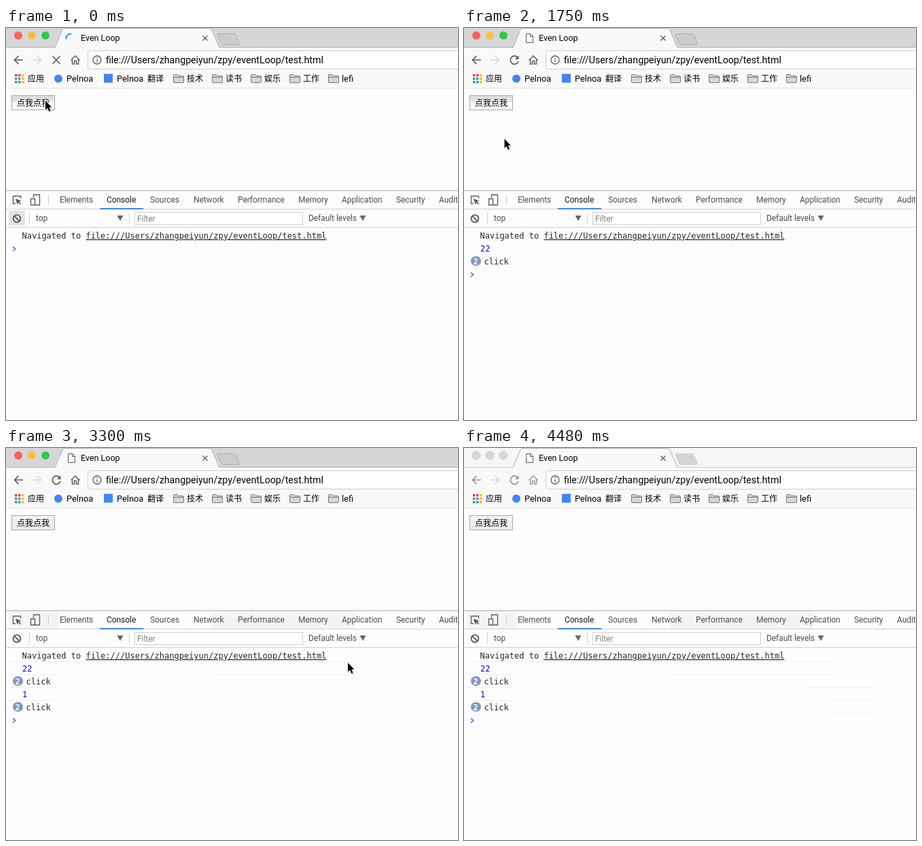
Animation of 665x577 px, one loop 4580 ms. Source, as an HTML page:

```html
<!DOCTYPE html>
<html lang="zh">
<head>
<meta charset="utf-8">
<title>Even Loop</title>
<style>
html, body { margin: 0; width: 100%; height: 100%; overflow: hidden; background: #fdfdfd; }
svg { display: block; width: 665px; height: 577px; }
text { font: 12px Roboto, 'Noto Sans CJK SC', 'Noto Sans CJK', sans-serif; fill: #000; white-space: pre; }
.mark text { font-size: 12.8px; }
.mark text.cjk, text.cjk { font: 500 12px 'Noto Sans CJK SC', 'Noto Sans CJK', sans-serif; }
.tabs text { fill: #4e4e4e; letter-spacing: -.06px; }
.mono text { font: 12px 'DejaVu Sans Mono', monospace; fill: #262626; }
.mono text.num { fill: #1c00cf; }
.icon { fill: none; stroke: #5a5a5a; stroke-width: 1.7; }
.thin { stroke-width: 1.3; }
#nav { stroke: currentColor; }
</style>
</head>
<body>
<svg id="stage" viewBox="0 0 665 577">
  <defs>
    <linearGradient id="plain" x2="0" y2="1">
      <stop stop-color="#f4f4f4"/><stop offset="1" stop-color="#ebebeb"/>
    </linearGradient>
    <linearGradient id="lit" x2="0" y2="1">
      <stop stop-color="#dcdcdc"/><stop offset=".44" stop-color="#e6e6e6"/>
      <stop offset=".46" stop-color="#fafafa"/><stop offset="1" stop-color="#fdfdfd"/>
    </linearGradient>
  </defs>
  <rect width="665" height="577" fill="#fdfdfd"/>

  <!-- tab strip -->
  <rect id="strip" width="665" height="29"/>
  <path id="edge" d="M0 28.5H665"/>
  <rect y="29" width="665" height="59" fill="#f9f9f9"/>
  <path d="M72 29L83 3Q84 .5 87 .5H299Q302 .5 303 3L314 29" fill="#f9f9f9" stroke="#b0b0b0"/>
  <g id="lights"></g>
  <path id="newTab" d="M313 8.5H335Q337.5 8.5 338.5 10.5L343 22Q344 24.5 341.5 24.5H320Q317.5 24.5 316.500 22.5L311.5 11Q310.5 8.5 313 8.5Z"/>
  <path d="M289.5 11.500l7 7m0-7l-7 7" class="icon thin"/>
  <text x="110" y="19" style="font-size:12.5px">Even Loop</text>
  <path id="spinner" fill="none" stroke="#4a8bd0" stroke-width="2"/>
  <path id="page" d="M91.5 8.5H98L101.5 12V21.5H91.5ZM97.5 8.5V12.5H101.5" fill="#fff" stroke="#5a5a5a"/>

  <!-- navigation -->
  <g id="nav" class="icon">
    <path d="M25 47H12.5M18.5 41l-6 6 6 6"/>
    <path d="M39 47H51.5M45.5 41l6 6-6 6" stroke="#d8d8d8"/>
    <path id="stop" d="M68.5 41.5l11 11m0-11l-11 11"/>
    <g id="reload"><path d="M79 43.5A6 6 0 1 0 80 49"/><path d="M80.5 40.5V46H75Z" fill="currentColor" stroke="none"/></g>
    <path d="M95.5 47.5L102 41l6.5 6.500M97.5 46V53H100.5V48.5H103.5V53H106.5V46" stroke-width="1.4"/>
  </g>
  <rect x="120.5" y="33.5" width="560" height="27" rx="3.5" fill="#fff" stroke="#cbcbcb"/>
  <g class="icon thin">
    <circle cx="134" cy="47" r="6"/>
    <path d="M134 46.2V50.5M134 43.2V44.8"/>
  </g>
  <text x="147" y="52" style="font-size:14.2px">file:///Users/zhangpeiyun/zpy/eventLoop/test.html</text>

  <!-- bookmarks -->
  <g id="apps"></g>
  <circle cx="77" cy="74.5" r="6" fill="#4285f4"/>
  <rect x="144" y="67.5" width="13" height="13" fill="#4285f4"/>
  <g id="marks" class="mark"></g>
  <path d="M0 88.5H665" stroke="#e4e4e4"/>

  <!-- page -->
  <rect id="button" x="8.5" y="99.5" width="63" height="21" stroke="#a6a6a6"/>
  <text class="cjk" x="16" y="114.5">点我点我</text>

  <!-- developer tools -->
  <g fill="#f4f4f4">
    <rect id="shadeLeft" x="4" y="240" width="73" height="26"/>
    <rect id="shadeRight" x="302" y="240" width="212" height="26"/>
  </g>
  <path d="M0 239.5H665" stroke="#adadad"/>
  <path d="M0 266.5H665M0 293.5H665" stroke="#d0d0d0"/>
  <rect x="138" y="265" width="64" height="2" fill="#4285f4"/>
  <g class="icon thin">
    <path d="M14 258.5H10.5V247.5H21.5V251"/>
    <path d="M14 251l8.5 3.5-3.2 1.3 3 3-1.2 1.2-3-3-1.5 3Z" fill="#5a5a5a" stroke="none"/>
    <path d="M40.5 250V245.5H49.5V260.5H43M36.5 251.5H42.5V260.5H36.5Z"/>
  </g>
  <path d="M62.5 245V261M34.5 272V288M181.5 272V288" stroke="#cfcfcf"/>
  <g id="tabs" class="tabs"></g>
  <rect id="hover" x="4" y="269" width="24" height="22" fill="#e4e4e4"/>
  <g class="icon" style="stroke-width:1.9"><circle cx="16" cy="280.5" r="5.4"/><path d="M12.2 276.7l7.6 7.6"/></g>
  <path d="M163.5 276H172.5L168 284ZM520.5 276H529.5L525 284Z" fill="#666"/>
  <rect x="189.5" y="271.5" width="247" height="18" fill="#fff" stroke="#cfcfcf"/>
  <g class="tabs">
    <text x="44" y="284">top</text>
    <text x="193" y="285" style="fill:#808080">Filter</text>
    <text x="445" y="284">Default levels</text>
  </g>

  <!-- console -->
  <g id="rules" stroke="#eee"></g>
  <g class="mono">
    <text x="23.5" y="310">Navigated to <tspan text-decoration="underline">file:///Users/zhangpeiyun/zpy/eventLoop/test.html</tspan></text>
    <g id="log"></g>
  </g>
  <path id="prompt" d="M10 -3.2l3.800 3.200-3.800 3.200" fill="none" stroke="#367cf1" stroke-width="1.6"/>

  <g id="cursor">
    <path d="M1 2V16l3.200-3 2.300 5 2.400-1-2.200-5H10Z" opacity=".18"/>
    <path d="M0 0V13.500l3-2.800 2.300 5.200 2.300-1-2.200-5.100H9.300Z" stroke="#fff" stroke-width="2" paint-order="stroke"/>
  </g>
</svg>
<script>
const LOOP = 4580, STEP = 60, LOADED = 1750, BLUR = 4480, ROW = 19;
const $ = id => document.getElementById(id);

function add(parent, tag, attrs, content = '') {
  const el = document.createElementNS('http://www.w3.org/2000/svg', tag);
  for (const key in attrs) el.setAttribute(key, attrs[key]);
  el.textContent = content;
  parent.appendChild(el);
  return el;
}
const show = (el, on) => el.setAttribute('visibility', on ? 'visible' : 'hidden');
const set = (el, key, value) => el.setAttribute(key, value);

const lights = ['#fc605c', '#fdbc40', '#34c84a'].map((color, i) => ({
  color, el: add($('lights'), 'circle', { cx: 18 + 20 * i, cy: 11, r: 6 })
}));

['#e94235', '#e94235', '#fbbc05', '#34a853', '#4285f4', '#fbbc05', '#34a853', '#4285f4', '#fbbc05']
  .forEach((fill, i) => add($('apps'), 'rect',
    { x: 13 + i % 3 * 5, y: 68 + Math.floor(i / 3) * 5, width: 3.4, height: 3.4, fill }));

const label = (x, text, cjk) => add($('marks'), 'text', { x, y: 79, class: cjk ? 'cjk' : '' }, text);
label(32, '应用', true);
label(89, 'Pelnoa');
label(163, 'Pelnoa');
label(208, '翻译', true);
['技术', '读书', '娱乐', '工作', 'lefi'].forEach((name, i) => {
  const x = 246 + 57 * i;
  add($('marks'), 'path', {
    transform: `translate(${x} 68)`,
    d: 'M.5 11V2Q.5 .5 2 .5H6L7.5 2.5H14Q15.5 2.5 15.5 4V11Q15.5 12.5 14 12.5H2Q.5 12.5 .5 11ZM1 4.5H15',
    fill: '#d6d6d6', stroke: '#757575'
  });
  label(x + 20, name, i < 4);
});

Object.entries({ Elements: 79, Console: 148, Sources: 212, Network: 276, Performance: 341,
  Memory: 430, Application: 494, Security: 574, Audits: 637 }).forEach(([name, x]) =>
  add($('tabs'), 'text', { x, y: 257, style: name === 'Console' ? 'fill:#1a1a1a' : '' }, name));

// console messages: time shown, time the repeat badge appears
const messages = [
  { text: '22', at: LOADED },
  { text: 'click', at: LOADED, twice: LOADED },
  { text: '1', at: 2280 },
  { text: 'click', at: 2690, twice: 2870 }
];
messages.forEach((m, i) => {
  const y = 329 + ROW * i;
  m.el = add($('log'), 'text', { x: 24, y, class: m.text === 'click' ? '' : 'num' }, m.text);
  if (m.twice) {
    m.badge = add($('log'), 'g', {});
    add(m.badge, 'rect', { x: 10, y: y - 12, width: 15, height: 14, rx: 7, fill: '#8097bd' });
    add(m.badge, 'text', { x: 13.5, y: y - .5, style: 'fill:#fff;font-weight:bold' }, '2');
  }
});

// row separators: x1, x2, y, time
const rules = [
  [3, 77, 314, 2870], [3, 77, 333, 2870], [3, 77, 352, 2870], [3, 77, 371, 2870],
  [77, 514, 314, 3300], [302, 514, 333, 3300], [514, 545, 314, 3360], [514, 545, 333, 3360],
  [500, 604, 352, 3650], [535, 604, 371, 3650], [535, 604, 390, 3650]
].map(([x1, x2, y, at]) => ({ at, el: add($('rules'), 'path', { d: `M${x1} ${y + .5}H${x2}` }) }));

// pointer path: time, x, y
const path = [
  [0, 58, 107], [530, 58, 107], [770, 53, 139], [990, 60, 167], [1690, 60, 167],
  [2220, 56, 134], [2750, 50, 113], [3140, 50, 113], [3190, 66, 123], [3250, 304, 221],
  [3300, 503, 316], [3360, 533, 348], [3480, 533, 348], [3650, 592, 407],
  [3830, 643, 483], [4050, 630, 571], [4110, 629, 574], [4160, 628, 590], [LOOP, 628, 590]
];

function pointer(t) {
  const i = path.findIndex(key => key[0] > t);
  const [t0, x0, y0] = path[i - 1], [t1, x1, y1] = path[i];
  const p = Math.floor((t - t0) / STEP) * STEP / (t1 - t0);
  return [x0 + (x1 - x0) * p, y0 + (y1 - y0) * p];
}

function arc(cx, cy, r, from, sweep) {
  const at = deg => {
    const a = deg * Math.PI / 180;
    return `${(cx + r * Math.cos(a)).toFixed(2)} ${(cy + r * Math.sin(a)).toFixed(2)}`;
  };
  return `M${at(from)}A${r} ${r} 0 0 1 ${at(from + sweep)}`;
}

function draw(t) {
  const loading = t < LOADED, active = t < BLUR;
  set($('strip'), 'fill', active ? '#d5d6d8' : '#f6f6f6');
  set($('edge'), 'stroke', active ? '#b4b4b4' : '#cdcdcd');
  set($('newTab'), 'fill', active ? '#cccdcf' : '#d4d4d4');
  set($('newTab'), 'stroke', active ? '#adadad' : '#d0d0d0');
  set($('nav'), 'color', active ? '#5a5a5a' : '#959595');
  for (const { el, color } of lights) {
    set(el, 'fill', active ? color : '#d8d8d8');
    set(el, 'stroke', active ? 'none' : '#cacaca');
  }

  show($('spinner'), loading);
  show($('stop'), loading);
  show($('page'), !loading);
  show($('reload'), !loading);
  const tick = Math.floor(t / 58.2) * 58.2;
  set($('spinner'), 'd', arc(95, 15, 6.3, 165 + tick * .36, 118));

  const lit = t < 590 || (!loading && t < 2870);
  set($('button'), 'fill', `url(#${lit ? 'lit' : 'plain'})`);
  show($('hover'), t < 60);
  show($('shadeLeft'), t >= 2870);
  show($('shadeRight'), t >= 3300);

  let rows = 0;
  for (const m of messages) {
    const on = t >= m.at, twice = t >= m.twice;
    rows += on;
    show(m.el, on);
    if (m.badge) {
      show(m.badge, twice);
      set(m.el, 'x', twice ? 29.5 : 24);
    }
  }
  set($('prompt'), 'transform', `translate(0 ${325 + ROW * rows})`);
  for (const { el, at } of rules) show(el, t >= at);

  const [x, y] = pointer(t);
  set($('cursor'), 'transform', `translate(${x} ${y})`);
}

const start = performance.now();
function frame() {
  draw((performance.now() - start) % LOOP);
  requestAnimationFrame(frame);
}
frame();
</script>
</body>
</html>
```
